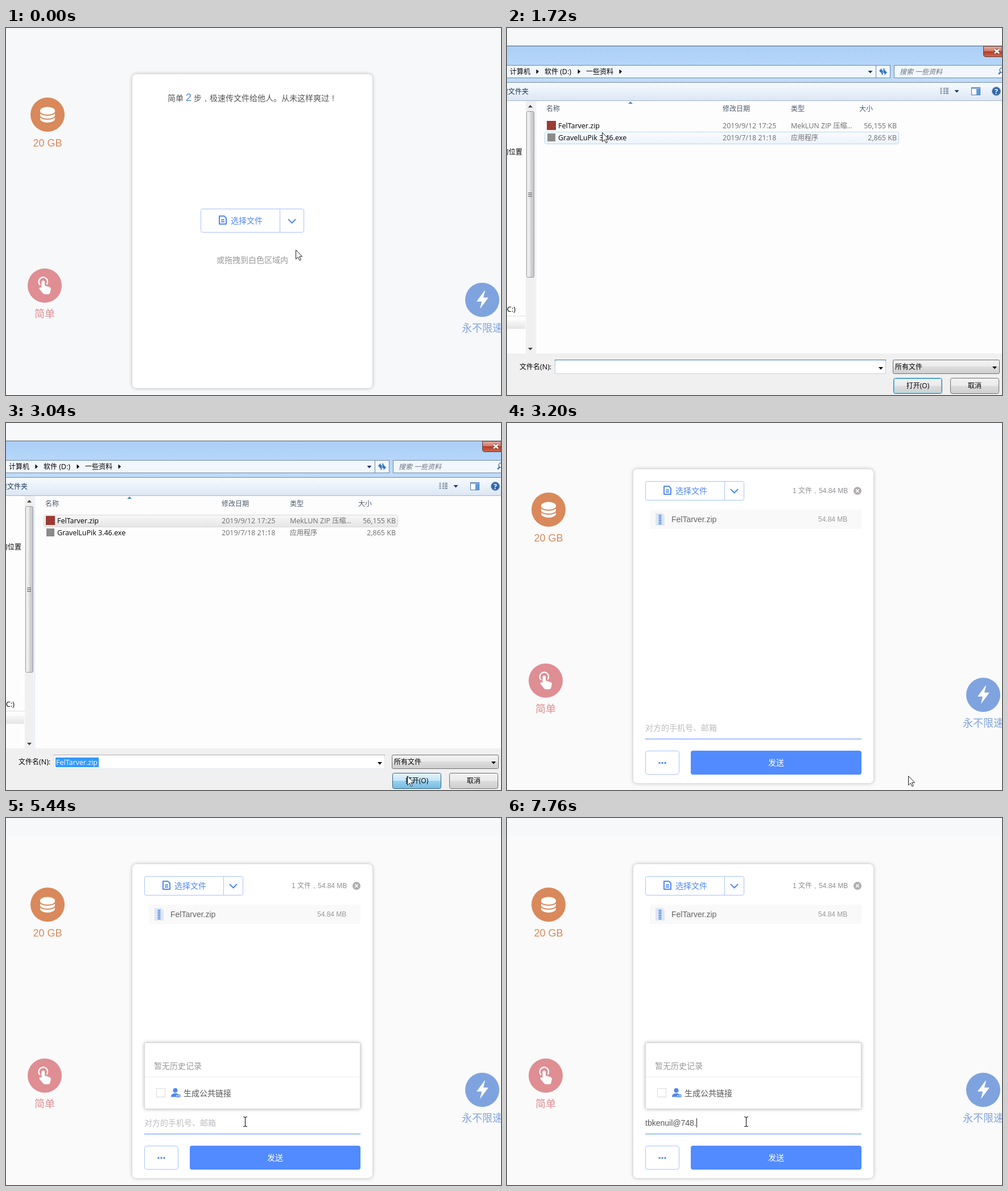
Recreate the animation shown at these times as an HTML page. Size 870x644 px, loop 8000 ms.

```html
<!DOCTYPE html>
<html lang="zh-CN">
<head>
<meta charset="utf-8">
<title>文件传输</title>
<style>
html, body { margin: 0; width: 100%; height: 100%; overflow: hidden; background: #f7f8fa; }
svg { display: block; width: 870px; height: 644px; }
text { white-space: pre; }
.page { font: 14px "Liberation Sans", "Noto Sans CJK SC", sans-serif; }
.win { font: 12px "Open Sans", "Noto Sans CJK SC", sans-serif; }
.lat { font-size: 12.5px; }
.big { font-size: 18px; }
.small { font-size: 12px; }
.mid { text-anchor: middle; }
.end { text-anchor: end; }
.line { fill: none; stroke: currentColor; stroke-width: 2; }
.thin { fill: none; stroke: currentColor; stroke-width: 1.4; }
.shadow { filter: drop-shadow(0 0 3px rgba(0,0,0,.28)); }
.blue { color: #4f88f5; fill: #4f88f5; }
.box { fill: #fff; stroke: #a6c3fb; }
</style>
</head>
<body>
<svg viewBox="0 0 870 644">
<defs>
  <path id="tri" d="M-4-2H4L0 2.5Z"/>
  <g id="doc" class="line">
    <path d="M1 1H9.5L13 4.5V15H1Z" stroke-linejoin="round"/>
    <path d="M4 7.5H10M4 11H10" stroke-width="1.8"/>
  </g>
  <path id="chevron" class="line" d="M-6.5-3L0 3.5L6.5-3"/>
  <linearGradient id="glass" x2="0" y2="1"><stop stop-color="#accff6"/><stop offset=".4" stop-color="#b7d7fa"/><stop offset="1" stop-color="#cfe4fa"/></linearGradient>
  <linearGradient id="bar" x2="0" y2="1"><stop stop-color="#f8fbfe"/><stop offset=".5" stop-color="#e9f1fa"/><stop offset="1" stop-color="#dbe6f3"/></linearGradient>
  <linearGradient id="red" x2="0" y2="1"><stop stop-color="#e5b0a6"/><stop offset=".48" stop-color="#cf7566"/><stop offset=".5" stop-color="#b53a25"/><stop offset="1" stop-color="#cf6a50"/></linearGradient>
  <linearGradient id="thumb"><stop stop-color="#f5f5f5"/><stop offset=".48" stop-color="#e6e6e8"/><stop offset=".5" stop-color="#d4d5d8"/><stop offset="1" stop-color="#c4c5ca"/></linearGradient>
  <linearGradient id="grey" x2="0" y2="1"><stop stop-color="#f2f2f2"/><stop offset=".48" stop-color="#ebebeb"/><stop offset=".5" stop-color="#dddddd"/><stop offset="1" stop-color="#cfcfcf"/></linearGradient>
  <linearGradient id="hot" x2="0" y2="1"><stop stop-color="#eaf6fd"/><stop offset=".48" stop-color="#d9f0fc"/><stop offset=".5" stop-color="#bee6fd"/><stop offset="1" stop-color="#a7d9f5"/></linearGradient>
  <linearGradient id="pressed" x2="0" y2="1"><stop stop-color="#e5f4fc"/><stop offset=".48" stop-color="#c4e5f6"/><stop offset=".5" stop-color="#98d1ef"/><stop offset="1" stop-color="#78bbdf"/></linearGradient>
  <linearGradient id="hoverRow" x2="0" y2="1"><stop stop-color="#fafbfd"/><stop offset="1" stop-color="#ebf3fd"/></linearGradient>
  <linearGradient id="pickedRow" x2="0" y2="1"><stop stop-color="#f8f8f8"/><stop offset="1" stop-color="#e5e5e5"/></linearGradient>
  <linearGradient id="focusEdge" x2="0" y2="1"><stop offset=".04" stop-color="#3d7bad"/><stop offset=".06" stop-color="#a4c9e3"/><stop offset="1" stop-color="#b7d9ed"/></linearGradient>
  <linearGradient id="idleEdge" x2="0" y2="1"><stop offset=".04" stop-color="#abadb3"/><stop offset=".06" stop-color="#e2e3ea"/><stop offset="1" stop-color="#e3e9ef"/></linearGradient>
</defs>

<!-- Web page -->
<g class="page">
  <rect width="870" height="644" fill="#f7f8fa"/>
  <rect id="tint" y="31" width="870" height="613" fill="#fafafa"/>

  <g fill="#d9895b">
    <circle cx="73" cy="152" r="30"/>
    <text x="73" y="208" class="big mid">20 GB</text>
    <path d="M60 145a13 6.5 0 0 1 26 0V159.5a13 6.5 0 0 1-26 0Z" fill="#fff"/>
    <path d="M59 146.5a14 6.5 0 0 0 28 0M59 153.5a14 6.5 0 0 0 28 0" fill="none" stroke="#d9895b" stroke-width="2"/>
  </g>
  <g fill="#df8e93">
    <circle cx="68" cy="452" r="30"/>
    <text x="50" y="508" class="big">简单</text>
    <path d="M60 451a7.8 7.8 0 1 1 11.5-1" fill="none" stroke="#fff" stroke-width="2.3"/>
    <path d="M62.5 446a2.8 2.8 0 0 1 5.6 0V452l8 2.4q3.2 1 2.7 4.2l-1.4 6.2q-.6 2.4-3 2.4h-6q-2.2 0-3.6-2l-6-7.2q-1-1.6.4-2.6q1.6-1 3.3.7Z" fill="#fff"/>
  </g>
  <g fill="#7fa3de">
    <circle cx="837" cy="477" r="30"/>
    <text x="801" y="533" class="big">永不限速</text>
    <path d="M841 461L827 480H836L833 493L848 473H839L842 461Z" fill="#fff"/>
  </g>

  <rect class="shadow" x="222" y="81" width="422" height="551" rx="7" fill="#fff"/>

  <g id="start">
    <g fill="#555">
      <text x="284" y="128">简单</text>
      <text x="316" y="128" class="big blue">2</text>
      <text x="330" y="128">步</text><text x="349" y="128">,</text>
      <text x="358" y="128">极速传文件给他人。从未这样爽过</text><text x="573" y="128">!</text>
      <text x="370" y="412" fill="#999">或拖拽到白色区域内</text>
    </g>
    <rect class="box" x="342.5" y="317.5" width="181" height="41" rx="3"/>
    <path d="M481.5 318V358" stroke="#a6c3fb"/>
    <path id="fill" d="M345 317H482V359H345a3 3 0 0 1-3-3V320a3 3 0 0 1 3-3Z" fill="#518bff"/>
    <g id="pick" class="blue">
      <use href="#doc" x="374" y="329"/>
      <text x="395" y="343" fill="currentColor">选择文件</text>
    </g>
    <use href="#chevron" x="502.5" y="338.5" class="blue"/>
  </g>

  <g id="send">
    <rect class="box" x="243.5" y="102.5" width="173" height="33" rx="3"/>
    <path d="M382.5 103V135" stroke="#a6c3fb"/>
    <g class="blue">
      <use href="#doc" x="275" y="110"/>
      <text x="296" y="124">选择文件</text>
      <use href="#chevron" x="399.5" y="119"/>
    </g>
    <g class="small" fill="#8f8f93">
      <text x="502" y="123">1 文件</text><text x="540" y="123">,</text>
      <text x="548" y="123">54.84 MB</text>
    </g>
    <circle cx="616" cy="119" r="7" fill="#b1adb3"/>
    <path d="M613.3 116.3l5.4 5.4m0-5.4l-5.4 5.4" stroke="#fff" stroke-width="1.6"/>
    <rect x="251" y="152" width="372" height="34" fill="#f9f9f9"/>
    <path d="M261 158H273L277 162V180H261Z" fill="#dfe7f1"/>
    <path d="M269 161V178" stroke="#5b94ee" stroke-width="5" stroke-dasharray="2 1"/>
    <text x="289" y="174" fill="#666">FelTarver.zip</text>
    <text x="547" y="173" class="small" fill="#999">54.84 MB</text>

    <text id="hint" x="243" y="540" fill="#bdbdc3">对方的手机号、邮箱</text>
    <text id="typed" x="243" y="540" fill="#555"></text>
    <rect id="caret" y="527" width="1" height="16" fill="#222"/>
    <rect x="243" y="554" width="380" height="1" fill="#518bff"/>

    <rect class="box" x="243.5" y="575.5" width="59" height="41" rx="4"/>
    <g class="blue"><circle cx="268" cy="596.5" r="1.7"/><circle cx="273" cy="596.5" r="1.7"/><circle cx="278" cy="596.5" r="1.7"/></g>
    <rect x="323" y="575" width="300" height="42" rx="4" fill="#518bff"/>
    <text x="459" y="601" fill="#fff">发送</text>

    <g id="popup">
      <rect class="shadow" x="243.5" y="394.5" width="379" height="116" rx="2" fill="#fff" stroke="#d5d5d5"/>
      <text x="260" y="440" fill="#999">暂无历史记录</text>
      <path d="M244 454.5H622" stroke="#ececec"/>
      <rect x="264.5" y="474.5" width="15" height="15" fill="#fff" stroke="#d9d9d9"/>
      <g class="blue">
        <circle cx="297.5" cy="478" r="4"/>
        <path d="M290 489.5q0-6.5 7.5-6.5q3 0 5 1.2q-4.5 1-4.5 5.3Z"/>
        <circle cx="300.5" cy="487.5" r="2" class="thin"/><circle cx="304" cy="487.5" r="2" class="thin"/>
      </g>
      <text x="312" y="488" fill="#555">生成公共链接</text>
    </g>
  </g>
</g>

<!-- File dialog -->
<g id="dialog" class="win">
  <rect y="31" width="870" height="97" fill="url(#glass)"/>
  <path d="M0 31.5H870" stroke="#56636f"/>
  <path d="M837.5 32H870V50.5H842q-4.5 0-4.5-4.5Z" fill="url(#red)" stroke="#5e3a3a"/>
  <path d="M857 37.5l8 7m0-7l-8 7" stroke="#5b4a4a" stroke-width="4.4"/>
  <path d="M857 37.5l8 7m0-7l-8 7" stroke="#fff" stroke-width="2.6"/>

  <g fill="#f1f7fd" stroke="#6f8aa9">
    <rect x="-1" y="65.5" width="674.5" height="22"/>
    <path d="M648.5 66V87"/>
    <rect x="680.5" y="65.5" width="200" height="22"/>
  </g>
  <text x="5" y="80.5">计算机</text>
  <text x="66" y="80.5">软件 <tspan class="lat">(D:)</tspan></text>
  <text x="139" y="80.5">一些资料</text>
  <use href="#tri" transform="translate(53.5 76.5) rotate(-90)"/>
  <use href="#tri" transform="translate(126.5 76.5) rotate(-90)"/>
  <use href="#tri" transform="translate(199.5 76.5) rotate(-90)"/>
  <use href="#tri" x="638.5" y="77" fill="#1e3c64"/>
  <g fill="#2f72c4">
    <path id="turn" d="M654 75l4.5-4.5V74H660.5V82H658.5V79.5Z"/>
    <use href="#turn" transform="rotate(180 661 76.5)"/>
  </g>
  <text x="690" y="80.5" fill="#6d7480" font-style="italic">搜索 一些资料</text>
  <path d="M864 81l4-4" stroke="#4e78ac" stroke-width="2.5"/><circle cx="870" cy="74" r="4" fill="none" stroke="#4e78ac" stroke-width="1.5"/>

  <rect y="95" width="870" height="33" fill="url(#bar)"/>
  <path d="M0 95.5H870" stroke="#7089a8"/>
  <path d="M0 127.5H870" stroke="#a3b5cb"/>
  <text x="-10" y="116" fill="#1e395b">建文件夹</text>
  <path d="M763 105V117M768.5 105V117" stroke="#66788f" stroke-width="3" stroke-dasharray="1.5 1.5"/>
  <path d="M773.5 105V117" stroke="#66788f" stroke-width="5" stroke-dasharray="1.5 1.5"/>
  <use href="#tri" x="790.5" y="111" fill="#1e395b"/>
  <rect x="816.5" y="104.5" width="15" height="13" fill="#fff" stroke="#5078a8"/>
  <path d="M817 106H831" stroke="#8fb1d8" stroke-width="2"/><rect x="825" y="107" width="6" height="10" fill="#5d9bdc"/>
  <circle cx="860" cy="111" r="7.5" fill="#2f67b0" stroke="#8aa0bd"/>
  <text x="860" y="115.5" class="mid lat" fill="#fff" font-weight="700">?</text>

  <rect y="128" width="870" height="444" fill="#fdfdfd"/>
  <text x="-9" y="222">的位置</text>
  <text x="0" y="498" class="lat">C:)</text>
  <path d="M0 505.5H33" stroke="#ddd"/>
  <rect x="-3" y="513" width="35" height="15" rx="2" fill="url(#pickedRow)"/>
  <rect x="33" y="128" width="16" height="444" fill="#f0f0f0"/>
  <path d="M50.5 128V572" stroke="#d6e5f5"/>
  <use href="#tri" transform="translate(41 137.5) rotate(180)" fill="#444"/>
  <use href="#tri" x="41" y="563" fill="#444"/>
  <rect x="34.5" y="146.5" width="13" height="291" rx="2" fill="url(#thumb)" stroke="#979797"/>
  <path d="M37 289.5h7m-7 3h7m-7 3h7" stroke="#555"/>

  <g fill="#4c5a6c">
    <text x="69" y="146">名称</text><text x="379" y="146">修改日期</text>
    <text x="499" y="146">类型</text><text x="619" y="146">大小</text>
  </g>
  <path d="M213 133H221L217 129Z" fill="#4a86b4"/>

  <rect id="row1" x="66.5" y="161.5" width="622" height="21" rx="3"/>
  <rect id="row2" x="66.5" y="182.5" width="622" height="21" rx="3" fill="url(#hoverRow)" stroke="#b8d6fb"/>
  <rect x="70" y="163" width="16" height="16" fill="#9c3a35"/>
  <rect x="71" y="185" width="14" height="14" fill="#8b8b8b"/>
  <g class="lat">
    <text x="90" y="176">FelTarver.zip</text>
    <text x="90" y="197">GravelLuPik 3.46.exe</text>
    <g fill="#6d6d6d">
      <text x="379" y="176">2019/9/12 17:25</text>
      <text x="379" y="197">2019/7/18 21:18</text>
      <text x="499" y="176">MekLUN ZIP <tspan class="small">压缩...</tspan></text>
      <text x="499" y="197" class="small">应用程序</text>
      <text x="685" y="176" class="end">56,155 KB</text>
      <text x="685" y="197" class="end">2,865 KB</text>
    </g>
  </g>

  <rect y="571" width="870" height="73" fill="#f0f0f0"/>
  <text x="22" y="599">文件名<tspan class="lat">(N):</tspan></text>
  <rect id="field" x="84.5" y="582.5" width="581" height="24" fill="#fff"/>
  <use href="#tri" x="657" y="597"/>
  <g id="chosen">
    <rect x="87" y="587" width="76" height="17" fill="#3399ff"/>
    <text x="88" y="600" class="lat" fill="#fff">FelTarver.zip</text>
  </g>
  <rect id="filter" x="678.5" y="582.5" width="187" height="24" rx="2" stroke="#707070"/>
  <text x="682" y="599">所有文件</text>
  <use href="#tri" x="857" y="596"/>
  <rect id="open" x="679.5" y="614.5" width="85" height="27" rx="3"/>
  <rect id="glow" x="680.5" y="615.5" width="83" height="25" rx="2" fill="none" stroke="#62cdf2"/>
  <text x="722" y="632" class="mid">打开(O)</text>
  <rect x="779.5" y="614.5" width="85" height="27" rx="3" fill="url(#grey)" stroke="#707070"/>
  <text x="822" y="632" class="mid">取消</text>
</g>

<path id="arrow" d="M.5.5V16.5L4.3 13L7 18.8L9.3 17.7L6.7 12H11.7Z" fill="#fff" stroke="#222"/>
<path id="beam" d="M-3-8.5H-1L.5-7L2-8.5H4M.5-7.5V7.5M-3 8.5H-1L.5 7L2 8.5H4" fill="none" stroke="#222" stroke-width="1.2"/>
</svg>

<script>
const LOOP = 8000, STEP = 40;
const $ = id => document.getElementById(id);
const show = (id, on) => { $(id).style.display = on ? "" : "none"; };
const paint = (id, fill, stroke) => {
  $(id).setAttribute("fill", fill);
  $(id).setAttribute("stroke", stroke);
};
const within = (t, a, b) => t >= a && t < b;
const ramp = (t, a, b) => Math.min(1, Math.max(0, (t - a) / (b - a)));

// time, x, y of the pointer
const route = [
  [0, 509, 389], [360, 509, 389], [800, 421, 350], [1200, 421, 350],
  [1720, 167, 183], [1880, 165, 173], [2040, 165, 173], [2860, 705, 619],
  [3320, 705, 619], [3920, 420, 533], [LOOP, 420, 533]
];
const address = "tbkenuil@748.";
const keyTimes = [5600, 5600, 5640, 5800, 5840, 6000, 6080, 6160, 6840, 7320, 7520, 7640, 7760];
const caretOn = [[4040, 4520], [5000, 5440], [5600, 6600], [6840, LOOP]];

function pointer(t) {
  const i = route.findIndex(p => p[0] > t);
  const [t0, x0, y0] = route[i - 1], [t1, x1, y1] = route[i];
  const u = (t - t0) / (t1 - t0), e = u * u * (3 - 2 * u);
  return [Math.round(x0 + (x1 - x0) * e), Math.round(y0 + (y1 - y0) * e)];
}

function drawPage(t) {
  const sent = t >= 3160;
  show("tint", sent);
  show("start", !sent);
  show("send", sent);

  const hover = t < 3080 ? ramp(t, 640, 840) : 0;
  $("fill").style.opacity = hover;
  $("pick").style.color = hover > .5 ? "#fff" : "#4f88f5";

  const count = keyTimes.filter(k => k <= t).length;
  $("typed").textContent = address.slice(0, count);
  show("hint", !count);
  show("caret", caretOn.some(([a, b]) => within(t, a, b)));
  const width = count && sent ? $("typed").getComputedTextLength() : 0;
  $("caret").setAttribute("x", 243 + Math.round(width));

  $("popup").style.opacity = ramp(t, 4000, 4160);
}

function drawDialog(t, x, y) {
  show("dialog", within(t, 1040, 3120));
  $("dialog").style.opacity = t < 1080 ? .6 : t < 3080 ? 1 : .5;

  const picked = t >= 1960, inList = x > 66 && x < 689;
  show("row1", picked || (inList && within(y, 162, 182)));
  show("row2", inList && within(y, 182, 204));
  show("chosen", picked);
  paint("row1", picked ? "url(#pickedRow)" : "url(#hoverRow)", picked ? "#d9d9d9" : "#b8d6fb");
  paint("field", "#fff", picked ? "url(#idleEdge)" : "url(#focusEdge)");

  const onFilter = x > 678 && within(y, 582, 607);
  const onOpen = x > 679 && x < 765 && within(y, 614, 642);
  const down = onOpen && t >= 2920;
  paint("filter", onFilter ? "url(#hot)" : "url(#grey)", "#707070");
  paint("open", down ? "url(#pressed)" : onOpen ? "url(#hot)" : "url(#grey)", down ? "#2c628b" : "#3c7fb1");
  show("glow", !down);
}

function draw(t) {
  const [x, y] = pointer(t);
  drawPage(t);
  drawDialog(t, x, y);
  const inField = t > 3320 && x < 623 && y < 555;
  show("arrow", !inField);
  show("beam", inField);
  $(inField ? "beam" : "arrow").setAttribute("transform", `translate(${x} ${y})`);
}

const begin = performance.now();
function tick() {
  const t = (performance.now() - begin) % LOOP;
  draw(Math.floor(t / STEP) * STEP);
  requestAnimationFrame(tick);
}
tick();
</script>
</body>
</html>
```
